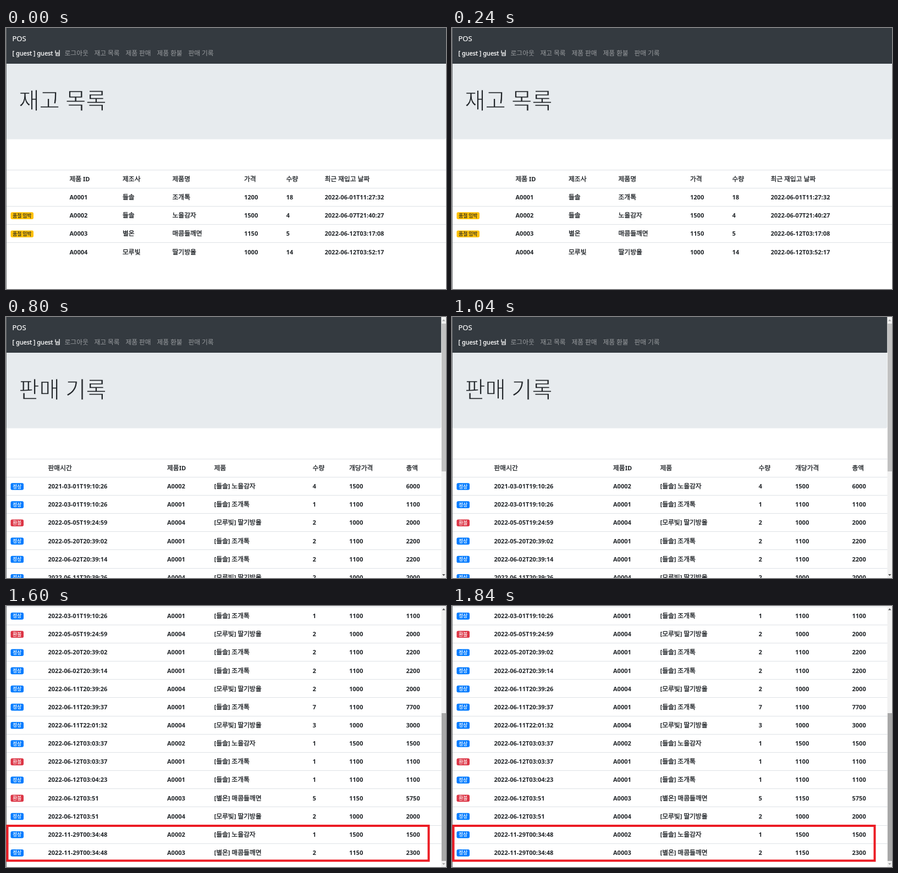
Recreate the animation shown at these times as an HTML page. Size 800 by 475 pixels, loop 2 s.

```html
<!DOCTYPE html>
<html lang="ko">
<head>
<meta charset="utf-8">
<title>POS</title>
<style>
  html, body { margin: 0; width: 100%; height: 100%; overflow: hidden; background: #fff; }
  svg { display: block; width: 800px; height: 475px; }
  text { font: 11px "Noto Sans", "Noto Sans CJK KR", "Noto Sans CJK", sans-serif; fill: #212529; }
  .ko { font-family: "Noto Sans CJK KR", "Noto Sans CJK", sans-serif; font-size: 1.07em; }
  .brand { font-size: 13px; fill: #fff; stroke: #fff; stroke-width: .15; }
  .user { fill: #fff; stroke: #fff; stroke-width: .3; }
  .link { fill: #999c9f; }
  .hover { fill: #ccced0; }
  /* The background-coloured stroke thins the strokes to a light weight. */
  .title { font-size: 38px; font-weight: 300; stroke: #e7ebee; stroke-width: 1; }
  .cell { font-weight: bold; }
  .cell .ko { font-weight: normal; stroke: #212529; stroke-width: .35; }
  .badge { font-size: 8.1px; font-weight: bold; text-anchor: middle; }
  .badge .ko { font-weight: normal; stroke: #212529; stroke-width: .2; }
  .light { fill: #fff; }
  .light .ko { stroke: #fff; }
  .mark { fill: none; stroke: #ec1c24; stroke-width: 4; }
  .line { fill: #dee2e6; shape-rendering: crispEdges; }
</style>
</head>
<body>
<svg id="stage" viewBox="0 0 800 475"></svg>
<script>
const STEP = 400, STEPS = 5;
const ROW_HEIGHT = 33.15, TABLE_TOP = 257.6, SCROLL = 323.2;

const products = {
  A0001: { maker: '들솔', name: '조개톡', price: 1100 },
  A0002: { maker: '들솔', name: '노을감자', price: 1500 },
  A0003: { maker: '별온', name: '매콤들깨면', price: 1150 },
  A0004: { maker: '모루빛', name: '딸기방울', price: 1000 },
};

// id, price, quantity, last restock
const stock = [
  ['A0001', 1200, 18, '2022-06-01T11:27:32'],
  ['A0002', 1500, 4, '2022-06-07T21:40:27'],
  ['A0003', 1150, 5, '2022-06-12T03:17:08'],
  ['A0004', 1000, 14, '2022-06-12T03:52:17'],
];

// time, id, quantity, refunded
const sales = [
  ['2021-03-01T19:10:26', 'A0002', 4],
  ['2022-03-01T19:10:26', 'A0001', 1],
  ['2022-05-05T19:24:59', 'A0004', 2, true],
  ['2022-05-20T20:39:02', 'A0001', 2],
  ['2022-06-02T20:39:14', 'A0001', 2],
  ['2022-06-11T20:39:26', 'A0004', 2],
  ['2022-06-11T20:39:37', 'A0001', 7],
  ['2022-06-11T22:01:32', 'A0004', 3],
  ['2022-06-12T03:03:37', 'A0002', 1],
  ['2022-06-12T03:03:37', 'A0001', 1, true],
  ['2022-06-12T03:04:23', 'A0001', 1],
  ['2022-06-12T03:51', 'A0003', 5, true],
  ['2022-06-12T03:51', 'A0004', 2],
  ['2022-11-29T00:34:48', 'A0002', 1],
  ['2022-11-29T00:34:48', 'A0003', 2],
];

const rect = (x, y, w, h, attrs) =>
  `<rect x="${x}" y="${y}" width="${w}" height="${h}" ${attrs}/>`;

// Hangul runs get their own, slightly larger font.
const text = (x, y, content, cls) =>
  `<text x="${x}" y="${y}" class="${cls}">` +
  String(content).replace(/[가-힣]+/g, '<tspan class="ko">$&</tspan>') + '</text>';

const badgeStyles = {
  '품절 임박': { width: 41.5, fill: '#ffc107', cls: 'badge' },
  '정상': { width: 23.5, fill: '#007bff', cls: 'badge light' },
  '환불': { width: 23.5, fill: '#dc3545', cls: 'badge light' },
};

function badge(label, y) {
  const { width, fill, cls } = badgeStyles[label];
  return rect(8.5, y - 6, width, 12.6, `rx="2.7" fill="${fill}"`) +
    text(8.5 + width / 2, y + 3.4, label, cls);
}

function table(width, columns, headings, rows) {
  return [{ cells: headings }, ...rows].map(({ label, cells }, i) => {
    const top = TABLE_TOP + i * ROW_HEIGHT;
    return rect(0, top, width, 1, 'class="line"') +
      (label ? badge(label, top + 17.4) : '') +
      cells.map((cell, c) => text(columns[c], top + 21.4, cell, 'cell')).join('');
  }).join('');
}

function page(width, title, content) {
  const links = [[106.5, '로그아웃'], [160.5, '재고 목록'], [217.5, '제품 판매'],
    [274.5, '제품 환불'], [331.5, '판매 기록']];
  return rect(0, 0, width, 65, 'fill="#343a40"') +
    text(11.5, 24, 'POS', 'brand') +
    text(11.5, 49.5, '[ guest ] guest 님', 'user') +
    links.map(([x, label]) => text(x, 50, label, 'link')).join('') +
    rect(0, 65, width, 137.4, 'rx="3.3" fill="#e7ebee"') +
    text(23.2, 146.5, title, 'title') + content;
}

const stockTable = table(800, [115.5, 212, 302.5, 433, 509.5, 579.5],
  ['제품 ID', '제조사', '제품명', '가격', '수량', '최근 재입고 날짜'],
  stock.map(([id, price, count, date]) => ({
    label: count <= 5 && '품절 임박',
    cells: [id, products[id].maker, products[id].name, price, count, date],
  })));

const salesTable = table(791.5, [76.5, 293, 378.5, 557.5, 624, 727.5],
  ['판매시간', '제품ID', '제품', '수량', '개당가격', '총액'],
  sales.map(([time, id, count, refunded]) => {
    const { maker, name, price } = products[id];
    return {
      label: refunded ? '환불' : '정상',
      cells: [time, id, `[${maker}] ${name}`, count, price, count * price],
    };
  }));

document.getElementById('stage').innerHTML = `
  <g id="stockPage">${page(800, '재고 목록', stockTable)}</g>
  <g id="salesPage">
    <g id="scroller">${page(791.5, '판매 기록', salesTable)}</g>
    ${rect(791.5, 0, 8.5, 475, 'fill="#f1f1f1"')}
    ${rect(792, 12, 8, 269, 'id="thumb"')}
    <path id="arrowUp" d="M793 7.5l2.8-3.2 2.8 3.2z"/>
    <path id="arrowDown" d="M793 468l2.8 3.2 2.8-3.2z"/>
  </g>
  ${rect(0, 0, 1, 475, 'fill="#6c6f72"')}
  ${rect(328, 35.5, 55, 25, 'id="linkMark" class="mark"')}
  ${rect(2.5, 400, 766, 63.5, 'id="rowsMark" class="mark"')}`;

const el = id => document.getElementById(id);
const show = (id, visible) => el(id).style.display = visible ? '' : 'none';
const salesLink = [...document.querySelectorAll('#stockPage .link')].pop();

function render(step) {
  const scrolled = step >= 3;
  show('stockPage', step < 2);
  show('salesPage', step >= 2);
  show('linkMark', step === 1);
  show('rowsMark', step === 4);
  salesLink.classList.toggle('hover', step === 1);
  el('scroller').setAttribute('transform', `translate(0 ${scrolled ? -SCROLL : 0})`);
  el('thumb').setAttribute('y', scrolled ? 195 : 12);
  el('thumb').setAttribute('fill', scrolled ? '#a8a8a8' : '#c1c1c1');
  el('arrowUp').setAttribute('fill', scrolled ? '#505050' : '#a3a3a3');
  el('arrowDown').setAttribute('fill', scrolled ? '#a3a3a3' : '#505050');
}

function tick() {
  render(Math.floor(performance.now() / STEP) % STEPS);
  requestAnimationFrame(tick);
}
tick();
</script>
</body>
</html>
```
